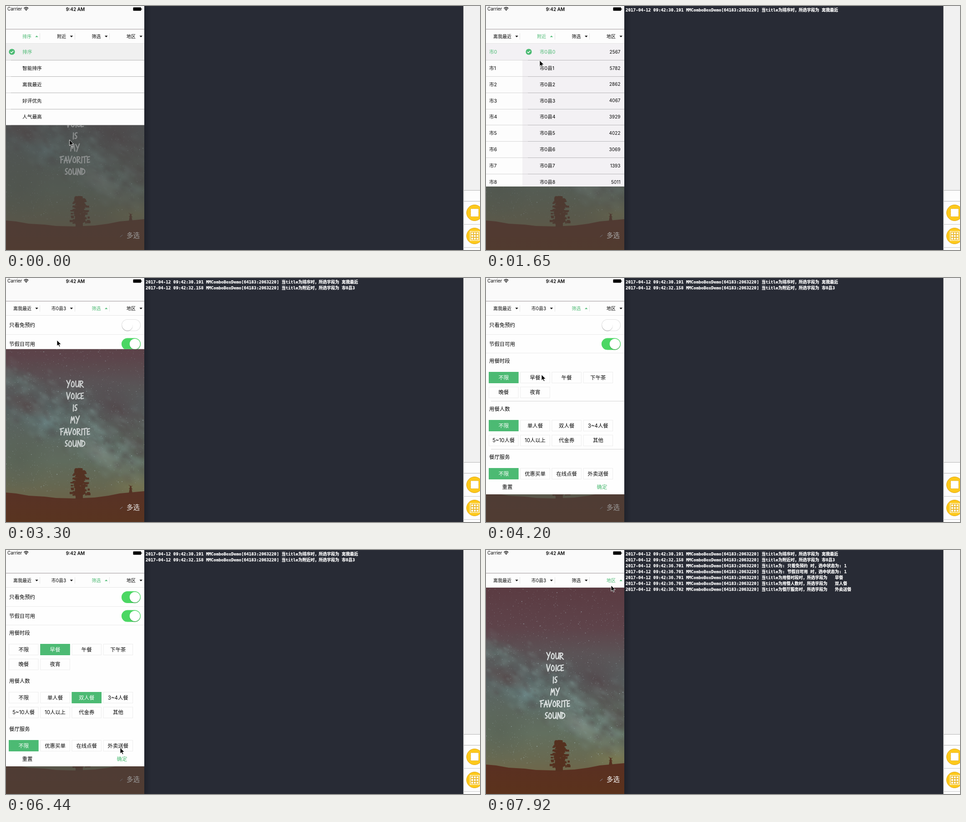
An HTML page with a canvas that plays this animation: 1042 by 538 pixels, repeating every 8000 ms.

```html
<!DOCTYPE html>
<html lang="zh-CN">
<head>
<meta charset="utf-8">
<title>Combo box demo</title>
<style>
html, body { margin: 0; width: 100%; height: 100%; overflow: hidden; background: #282b35; }
canvas, #ui { position: absolute; left: 0; top: 0; display: block; }
#ui { width: 1042px; height: 538px; }
text { font-family: Inter, "Noto Sans CJK SC", "Noto Sans CJK", sans-serif; white-space: pre; }
.log text {
  font-family: "DejaVu Sans Mono", "Noto Sans CJK SC", "Noto Sans CJK", monospace;
  font-weight: 700; stroke: #fff; stroke-width: .25px;
}
.log tspan { font-size: 9px; }
</style>
</head>
<body>
<canvas id="photo" width="304" height="538"></canvas>
<svg id="ui" viewBox="0 0 1042 538" xmlns="http://www.w3.org/2000/svg"></svg>
<script>
const GREEN = '#4cba73', INK = '#050505', LOOP = 8000;

// ---------- photo ----------
const GLYPHS = {
  Y: [10, 'M1 1L5 9M9 0L3 17'],
  O: [10, 'M5 3C1 5 0 14 4 15C9 15 9 5 4 3'],
  U: [10, 'M1 2C1 9 1 16 4 15C7 14 8 8 8 2V15'],
  R: [9, 'M1 2V16M0 3C8 0 9 7 1 9L8 16'],
  V: [10, 'M1 1L4 16L9 1'],
  I: [4, 'M2 2L1.6 16'],
  C: [8, 'M7 3C2 3 0 8 1 13C2 16 5 14 7 13'],
  E: [7, 'M6 2L1 3V15L6 14M1 9L5 8'],
  S: [7, 'M6 2C2 1 0 6 3 8C7 10 5 16 1 14'],
  M: [11, 'M1 16L3 2L5 10L8 2L10 16'],
  F: [8, 'M2 2V16M0 3L8 1M2 9L6 8'],
  A: [9, 'M1 16L5 2L8 16M1 11L9 10'],
  T: [9, 'M4 2L4 16M0 3L9 1'],
  N: [9, 'M1 16L2 2L7 15L8 1'],
  D: [9, 'M2 2L1 15M0 2C11 2 10 14 1 15']
};

let seed = 7;
const rnd = () => (seed = (seed * 16807) % 2147483647) / 2147483647;
const spread = () => rnd() + rnd() - 1;

function paintPhoto() {
  const g = document.getElementById('photo').getContext('2d');
  const sky = g.createLinearGradient(0, 83, 0, 485);
  [[0, '#5b3b42'], [.22, '#5e434a'], [.36, '#5b5356'], [.5, '#576060'],
   [.8, '#626f5f'], [.93, '#686a52'], [1, '#6e674b']].forEach(s => sky.addColorStop(...s));
  g.fillStyle = sky;
  g.fillRect(0, 0, 304, 538);

  const glow = (x, y, rx, ry, turn, rgb, a) => {
    g.save();
    g.translate(x, y);
    g.rotate(turn);
    g.scale(rx, ry);
    const r = g.createRadialGradient(0, 0, 0, 0, 0, 1);
    r.addColorStop(0, `rgba(${rgb},${a})`);
    r.addColorStop(1, `rgba(${rgb},0)`);
    g.fillStyle = r;
    g.fillRect(-1, -1, 2, 2);
    g.restore();
  };
  glow(20, 228, 90, 34, .35, '92,112,108', .7);
  glow(85, 318, 80, 45, .5, '96,124,124', .6);
  glow(88, 318, 24, 20, 0, '130,165,168', .4);
  glow(190, 350, 150, 55, .6, '98,120,116', .55);
  glow(205, 385, 60, 26, .6, '155,170,162', .5);
  glow(255, 420, 60, 28, .5, '126,138,118', .4);
  glow(45, 282, 60, 26, .3, '96,68,68', .5);
  glow(245, 290, 90, 55, .5, '84,62,68', .6);
  glow(285, 365, 45, 30, .5, '84,76,74', .5);
  glow(30, 400, 70, 70, 0, '84,92,80', .5);
  glow(285, 460, 70, 30, 0, '136,134,84', .5);

  // mottled clouds along the galaxy, then stars
  for (let i = 0; i < 420; i++) {
    const x = rnd() * 304, y = 240 + x * .48 + spread() * 90, r = 3 + rnd() * 11;
    glow(x, y, r * 1.5, r, .6, rnd() < .5 ? '132,158,154' : '78,66,68', .05 + rnd() * .2);
  }
  for (let i = 0; i < 2400; i++) {
    const r = rnd() < .06 ? 1.5 : .9;
    g.fillStyle = `rgba(180,200,206,${.06 + rnd() ** 3 * .75})`;
    g.fillRect(rnd() * 304, 84 + rnd() * 385, r, r);
  }

  // hill, tree, mast
  const earth = g.createLinearGradient(0, 470, 0, 538);
  earth.addColorStop(0, '#5a3022');
  earth.addColorStop(1, '#5b321c');
  g.fillStyle = earth;
  g.fill(new Path2D('M0 473L22 475L50 480L85 482L110 485L150 486L195 484L225 480L250 475L304 470V538H0Z'));
  g.fillStyle = '#55301f';
  g.fillRect(153, 470, 16, 18);
  for (let i = 0; i < 260; i++) {
    const v = rnd(), tier = (v * 5) % 1, w = 8 + v * 15 + tier * 5;
    g.fillRect(157 + v * 4 + spread() * w, 419 + v * 58, 3 + rnd() * 6, 2 + rnd() * 3);
  }
  g.fill(new Path2D('M273 458L275 458L278 475H270Z'));
  g.strokeStyle = '#55301f';
  g.stroke(new Path2D('M270 456L278 466M278 458L270 465'));

  // hand lettering
  g.strokeStyle = 'rgba(232,236,236,.9)';
  g.lineWidth = 2.3;
  g.lineCap = g.lineJoin = 'round';
  ['YOUR', 'VOICE', 'IS', 'MY', 'FAVORITE', 'SOUND'].forEach((word, i) => {
    const width = [...word].reduce((n, c) => n + GLYPHS[c][0], 0);
    let x = 151.8 - width / 2;
    for (const c of word) {
      g.save();
      g.translate(x, 225 + i * 26.3);
      g.stroke(new Path2D(GLYPHS[c][1]));
      g.restore();
      x += GLYPHS[c][0];
    }
  });
  g.strokeStyle = '#8f95a8';
  g.lineWidth = 1;
  g.stroke(new Path2D('M251 509L256 505'));
}

// ---------- markup helpers ----------
const rect = (x, y, w, h, fill, more = '') =>
  `<rect x="${x}" y="${y}" width="${w}" height="${h}" fill="${fill}" ${more}/>`;
const text = (x, y, s, size, fill = INK, anchor = 'start', more = '') =>
  `<text x="${x}" y="${y + size * .37}" font-size="${size}" fill="${fill}" text-anchor="${anchor}" ${more}>${s}</text>`;
const check = (x, y, id) =>
  `<g id="${id}"><circle cx="${x}" cy="${y}" r="6.6" fill="${GREEN}"/>
   <path d="M${x - 3.2} ${y}l2.3 2.4l4.2 -4.4" fill="none" stroke="#fff" stroke-width="1.6"/></g>`;
const panel = (id, body) =>
  `<svg id="${id}" x="0" y="83" width="304" height="0"><g transform="translate(0 -83)">${body}</g></svg>`;
const range = n => [...Array(n).keys()];

const PITCH = 35.88;
const rowY = i => 83 + i * PITCH;
const line = (x, y, w, c) => rect(x, Math.round(y), w, 1, c);

function sortMenu() {
  const rows = ['排序', '智能排序', '离我最近', '好评优先', '人气最高'];
  return panel('menu0', rect(0, 83, 304, 180, '#fdfdfd') + rows.map((s, i) =>
    rect(0, rowY(i), 304, PITCH, '#f0f0f0', `id="srow${i}"`) +
    text(36, rowY(i) + 18, s, 10.7, INK, 'start', `id="stext${i}"`) +
    check(13, rowY(i) + 18, 'scheck' + i)).join('') +
    range(5).map(i => line(0, rowY(i + 1), 11, '#d0d0d0') + line(11, rowY(i + 1), 293, '#b4b4b4')).join(''));
}

function areaMenu() {
  const counts = [2567, 5782, 2862, 4067, 3929, 4022, 3069, 1393, 5011, 6229];
  return panel('menu1', rect(0, 83, 304, 361, '#fdfdfd') + rect(80, 83, 224, 359, '#f3f1f4') +
    rect(0, 83, 80, PITCH, '#f3f1f4') + counts.map((n, i) => {
      const y = rowY(i) + 18, b = rowY(i + 1);
      return text(7, y, '市' + i, 10.6, i ? INK : GREEN) +
        text(118, y, '市0县' + i, 10.6, INK, 'start', `id="atext${i}"`) +
        text(295.5, y, n, 10, INK, 'end') + check(94, y, 'acheck' + i) +
        line(0, b, 80, '#d6d6d6') + line(80, b, 12, '#d4d2d5') + line(92, b, 212, '#b9b8bb');
    }).join(''));
}

const toggle = (y, id) =>
  `<g id="${id}">${rect(254.5, y - 12.5, 41, 25, '#fff', 'class="track" rx="12.5" stroke="#e2e2e2" stroke-width="1.2"')}
   <circle class="shade" cy="${y + 1.8}" r="11.6" fill="#000" opacity=".16"/>
   <circle class="knob" cy="${y}" r="11.5" fill="#fff"/></g>`;

const GROUPS = [
  ['用餐时段', '不限 早餐 午餐 下午茶 晚餐 夜宵'],
  ['用餐人数', '不限 单人餐 双人餐 3~4人餐 5~10人餐 10人以上 代金券 其他'],
  ['餐厅服务', '不限 优惠买单 在线点餐 外卖送餐']
].map(([title, items]) => [title, items.split(' ')]);

function filterMenu() {
  const groups = GROUPS.map(([title, items], k) => {
    const top = 183 + k * 106;
    return text(7, top, title, 11.4) + items.map((s, i) => {
      const x = 6.5 + (i % 4) * 69.2, y = top + 24.5 + (i >> 2) * 32.7;
      return rect(x, y, 64.6, 24, '#fefefe', `id="box${k}${i}" stroke="#ededed"`) +
        text(x + 32.3, y + 12, s, 11.4, INK, 'middle', `id="opt${k}${i}"`);
    }).join('');
  }).join('');
  return panel('menu2', rect(0, 83, 304, 394, '#fefefe') +
    text(7, 104, '只看免预约', 11.4) + toggle(104, 'sw0') + line(0, 124, 304, '#ebebeb') +
    text(7, 145.5, '节假日可用', 11.4) + toggle(145.5, 'sw1') + line(0, 165, 304, '#ebebeb') +
    groups + `<g id="rules">${line(11, 271, 293, '#d4d4d4')}${line(11, 377, 293, '#d4d4d4')}</g>` +
    text(47, 461, '重置', 11.4, INK, 'middle') + text(255, 461, '确定', 11.4, GREEN, 'middle'));
}

function header() {
  return rect(0, 0, 304, 51, '#fafafa') + rect(0, 50.5, 304, 1, '#b2b2b2') +
    rect(0, 51.5, 304, 31.5, '#fdfdfd') + rect(0, 82, 304, 1, '#e6e6e6') +
    text(3, 6.8, 'Carrier', 9.9) + text(152.5, 6.8, '9:42 AM', 10, INK, 'middle', 'font-weight="600"') +
    `<g fill="none" stroke="#000" stroke-width="1.5"><path d="M39.5 5.3Q44.3 .8 49.1 5.3M41.3 7.4Q44.3 4.6 47.3 7.4"/></g>
     <path d="M42.6 8.8Q44.3 7.4 46 8.8L44.3 10.6Z"/>` +
    rect(279.5, 3, 17.5, 7.6, '#000', 'rx="1.4"') + rect(297.6, 5.2, 1.2, 3.2, '#000', 'rx=".6"') +
    [74, 151, 227].map(x => rect(x, 60, 1, 14, '#e4e4e4')).join('') +
    range(4).map(i => text(56 + i * 76.3, 67, '', 10, INK, 'end', `id="head${i}"`) +
      `<path id="arrow${i}"/>`).join('');
}

const STAMP = '2017-04-12 09:42:', APP = ' MMComboBoxDemo[64183:2063220] 当title为';
const LOGS = [
  ['30.191', '排序时，所选字段为 离我最近'],
  ['32.158', '附近时，所选字段为 市0县3'],
  ['36.701', ': 只看免预约 时，选中状态为: 1'],
  ['36.701', ': 节假日可用 时，选中状态为: 1'],
  ['36.701', '用餐时段时，所选字段为   早餐'],
  ['36.701', '用餐人数时，所选字段为   双人餐'],
  ['36.702', '餐厅服务时，所选字段为   外卖送餐']
];
const logLine = ([sec, msg]) =>
  (STAMP + sec + APP + msg).replace(/[^\x00-\x7f]+/g, '<tspan>$&</tspan>');

function desktop() {
  const badge = (y, art) =>
    `<circle cx="1030" cy="${y}" r="17.5" fill="#fdc91b" stroke="#dfa514"/>${art}`;
  const grid = range(9).map(i =>
    rect(1022.5 + (i % 3) * 5.8, 499 + (i / 3 | 0) * 5.8, 4.6, 4.6, '#fff', 'stroke="#d9a21a" stroke-width=".6"')).join('');
  return `<linearGradient id="edge"><stop stop-color="#1f222b"/><stop offset="1" stop-color="#282b35"/></linearGradient>` +
    rect(304, 0, 701, 538, '#282b35') + rect(304, 0, 15, 538, 'url(#edge)') +
    rect(1005, 0, 37, 538, '#f1f1f1') + rect(1005, 406, 37, 132, '#fdfdfd') +
    rect(1005, 0, 1, 538, '#939393') +
    line(1005, 406, 37, '#b5b5b5') + line(1005, 430, 37, '#b5b5b5') +
    line(1005, 481, 37, '#c9c9c9') + line(1005, 532, 37, '#c9c9c9') +
    badge(456, rect(1021.5, 447, 17.5, 17.5, '#fff', 'stroke="#d9a21a" stroke-width="1" stroke-dasharray="2 1.5"')) +
    badge(507, rect(1020.5, 497, 20, 20, 'none', 'stroke="#fff" stroke-width="1.2"') + grid) +
    `<g class="log">${LOGS.map((entry, i) =>
      text(307, 9 + i * 13, logLine(entry), 9.2, '#fff', 'start', `id="log${i}"`)).join('')}</g>`;
}

// ---------- build ----------
paintPhoto();
const ui = document.getElementById('ui');
ui.innerHTML = text(265, 505.5, '多选', 14.4, '#fff', 'start', 'font-weight="300"') +
  rect(0, 83, 304, 455, '#464646', 'id="dim"') +
  sortMenu() + areaMenu() + filterMenu() + header() + desktop() +
  `<path id="cursor" d="M0 0V13L3 10.3L5 14.8L7.1 13.9L5.1 9.5H9.3Z" fill="#000" stroke="#fff" stroke-width=".9"/>`;
const el = {};
ui.querySelectorAll('[id]').forEach(n => el[n.id] = n);
const set = (id, name, v) => el[id].setAttribute(name, v);
const show = (id, on) => set(id, 'visibility', on ? 'inherit' : 'hidden');

// ---------- timeline ----------
// menu: opens, choice made, starts closing, height
const MENUS = [
  [-1000, 440, 514, 179.5],
  [1417, 2390, 2545, 361],
  [3217, 6930, 7000, 394],
  [7900, 9000, 9000, 0]
];
// time, x, y of the pointer tip
const POINTER = [
  [0, 139.5, 295], [150, 137, 270], [300, 129, 212], [450, 124, 183], [750, 123.5, 183],
  [900, 122, 125], [1050, 120, 80], [1200, 112, 69], [1350, 112, 69], [1650, 118, 120],
  [1950, 130, 200], [2400, 131, 204], [2550, 131, 163], [2850, 182, 80], [3000, 190, 71],
  [3150, 190, 71], [3300, 112, 137], [3600, 113, 185], [4200, 122, 213], [4350, 122, 214],
  [4800, 142, 338], [4950, 142, 338], [5100, 165, 326], [5250, 168, 324], [5550, 262, 120],
  [5700, 271, 104], [5850, 270, 150], [6140, 256, 462], [6440, 251, 436], [6590, 251, 435],
  [6890, 254, 460], [7190, 254, 458], [7330, 256, 426], [7780, 274, 92], [7920, 275, 78]
];

const ease = x => (x = Math.min(1, Math.max(0, x)), x * x * (3 - 2 * x));

const tickTime = k => k * 150 - 10 * ((k >= 41) + (k >= 49) + (k >= 53));
function tick(t) {
  let k = Math.min(53, Math.floor(t / 150) + 1);
  while (tickTime(k) > t) k--;
  return tickTime(k);
}

function pointerAt(t) {
  const i = POINTER.findIndex(p => p[0] > t);
  if (i < 0) return POINTER[POINTER.length - 1].slice(1);
  const [a, b] = [POINTER[i - 1], POINTER[i]], f = (t - a[0]) / (b[0] - a[0]);
  return [a[1] + (b[1] - a[1]) * f, a[2] + (b[2] - a[2]) * f];
}

function setToggle(id, on) {
  const n = el[id], track = n.querySelector('.track');
  track.setAttribute('fill', on ? '#4bd763' : '#fff');
  track.setAttribute('stroke', on ? '#4bd763' : '#e2e2e2');
  n.querySelectorAll('circle').forEach(c => c.setAttribute('cx', on ? 283.3 : 267));
}

function draw(t) {
  const heads = [t < 440 ? '排序' : '离我最近', t < 2390 ? '附近' : '市0县3', '筛选', '地区'];
  let dim = 0;
  MENUS.forEach(([open, pick, close, h], i) => {
    const grow = ease((t - open) / 300), amount = grow - ease((t - close) / 300);
    if (h) {
      set('menu' + i, 'height', (h * amount).toFixed(2));
      show('menu' + i, amount > .001);
      if (t < close) dim = Math.max(dim, grow);
    }
    const active = t >= open && t < pick, x = 67.5 + i * 76.4, color = active ? GREEN : INK;
    el['head' + i].textContent = heads[i];
    set('head' + i, 'fill', color);
    set('arrow' + i, 'fill', color);
    set('arrow' + i, 'd', active ? `M${x - 3.2} 68.6h6.4l-3.2 -3.3Z` : `M${x - 3.2} 65.6h6.4l-3.2 3.3Z`);
  });
  set('dim', 'opacity', dim * .53);

  const sort = t < 440 ? 0 : 2, area = t < 2390 ? 0 : 3;
  range(5).forEach(i => {
    show('srow' + i, i === sort);
    show('scheck' + i, i === sort);
    set('stext' + i, 'fill', i === sort ? GREEN : INK);
  });
  range(10).forEach(i => {
    show('acheck' + i, i === area);
    set('atext' + i, 'fill', i === area ? GREEN : INK);
  });

  const picks = [t < 4350 ? 0 : 1, t < 5250 ? 0 : 2, t < 6590 ? 0 : 3];
  GROUPS.forEach(([, items], k) => items.forEach((_, i) => {
    const on = i === picks[k];
    set(`box${k}${i}`, 'fill', on ? GREEN : '#fefefe');
    set(`box${k}${i}`, 'stroke', on ? GREEN : '#ededed');
    set(`opt${k}${i}`, 'fill', on ? '#fff' : INK);
  }));
  setToggle('sw0', t >= 5700);
  setToggle('sw1', true);
  show('rules', t < 6290);

  const logged = t < 440 ? 0 : t < 2390 ? 1 : t < 6930 ? 2 : 7;
  LOGS.forEach((_, i) => show('log' + i, i < logged));
  set('cursor', 'transform', `translate(${pointerAt(t).map(v => v.toFixed(1))})`);
}

const start = performance.now();
function frame(now) {
  draw(tick(Math.max(0, now - start) % LOOP));
  requestAnimationFrame(frame);
}
draw(0);
requestAnimationFrame(frame);
</script>
</body>
</html>
```
